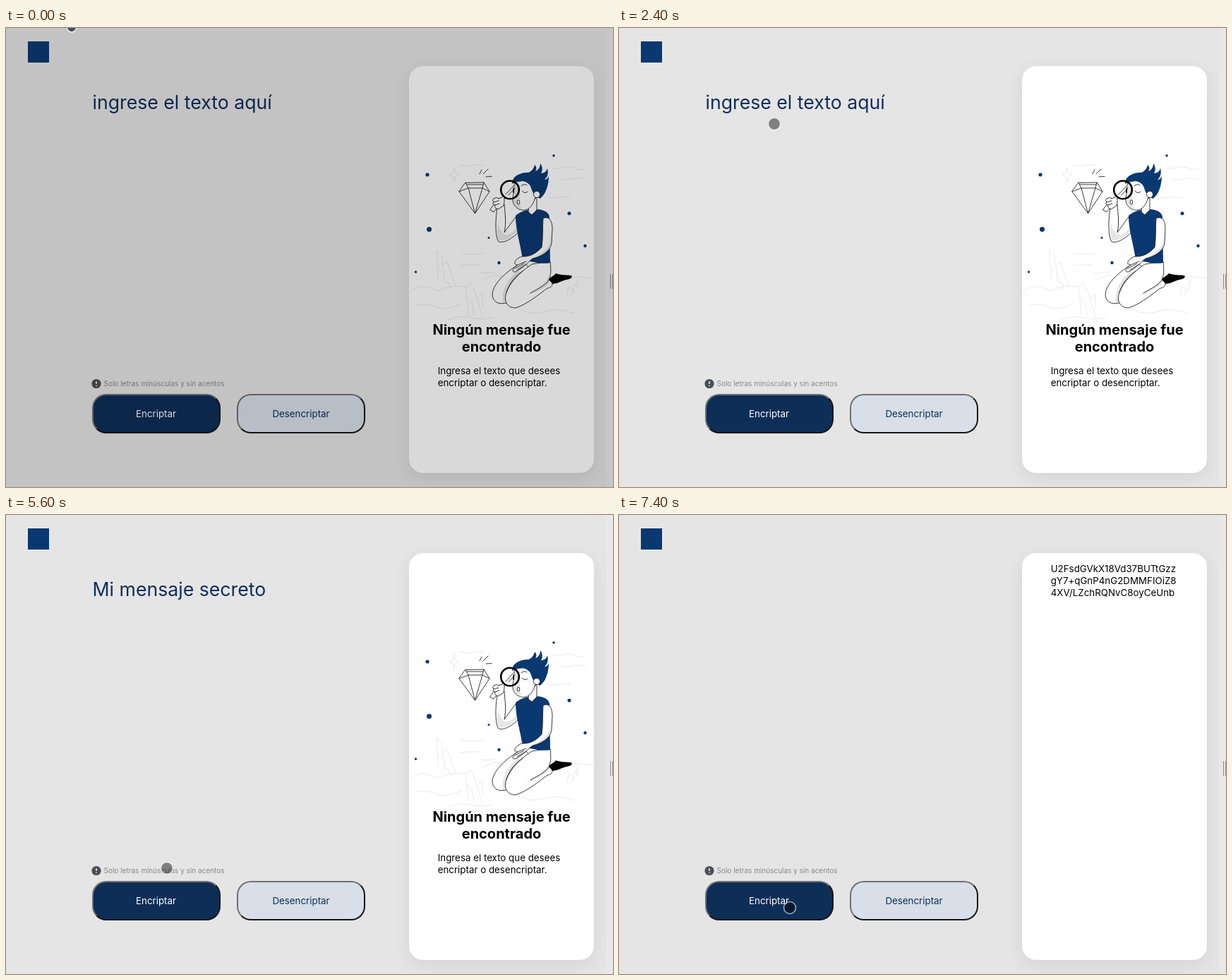
An HTML page for the animation above (8000 ms loop, 860 by 651 pixels).

```html
<!DOCTYPE html>
<html lang="es">
<head>
<meta charset="utf-8">
<style>
  html, body { margin: 0; width: 860px; height: 651px; overflow: hidden; background: #e5e5e5; }
  body { position: relative; font: 13.333px Inter, sans-serif; }
  div, svg { position: absolute; box-sizing: border-box; }
  svg { left: 0; top: 0; }
  .card { left: 571px; top: 54px; width: 262px; height: 577px; border-radius: 20px; background: #fff;
          box-shadow: 0 7px 26px rgba(0, 0, 0, .08); }
  .edge { left: 850px; top: 0; width: 10px; height: 651px; background: #e8e8e8; }
  .button { top: 519px; width: 182px; height: 56px; border: 2px solid; border-radius: 20px;
            border-color: #717171 #161616 #161616 #717171; text-align: center; line-height: 52px; }
  .button.pressed { border-color: #161616 #717171 #717171 #161616; }
  #encrypt { left: 121.5px; background: #0d2e57; color: #fff; }
  #decrypt { left: 327px; background: #d8dfe8; color: #0d2e57; }
  .ink { fill: none; stroke: #222; stroke-width: .9; stroke-linecap: round; stroke-linejoin: round; }
  .skin { fill: #fff; stroke: #222; stroke-width: .9; stroke-linejoin: round; }
  .navy { fill: #0a3871; }
  .faint { fill: none; stroke: #ebebeb; stroke-width: 1; }
  .shade { fill: #e6e6e6; }
</style>
</head>
<body>
<div class="card"></div>
<div class="edge"></div>
<div class="button" id="encrypt">Encriptar</div>
<div class="button" id="decrypt">Desencriptar</div>

<svg width="860" height="651" viewBox="0 0 860 651">
  <rect class="navy" x="31" y="19" width="30" height="30"/>
  <path d="M856.5 349V370M859.5 349V370" stroke="#8c8c8c"/>

  <text id="field" x="122.5" y="115" font-size="26.667" fill="#102e5c"></text>
  <rect id="caret" y="89" width="1" height="32" fill="#222"/>

  <circle cx="128" cy="504.5" r="6.6" fill="#495057"/>
  <path d="M128 501V505M128 506.7V508" stroke="#fff" stroke-width="1.4"/>
  <text x="138.5" y="508" font-size="10" fill="#888">Solo letras minúsculas y sin acentos</text>

  <g id="empty">
    <g class="faint">
      <path d="M635 198Q635 207 642 208Q636 209 635 218Q635 209 628 208Q634 207 635 198Z"/>
      <path d="M643 194q8 3 16 1t17 0M774 198q8 3 16 0t16 1 15 0M785 214q8 3 16 0t21 1M766 240q8 2 16 0t18 1"/>
      <path d="M645 320q16 2 32 0M643 337q14-2 27-1M672 347q12 2 22-1"/>
      <path d="M572 374Q585 365 594 367T612 373Q626 364 652 367M675 358L692 350L703 353M774 353Q805 351 833 355"/>
      <path d="M581 393Q598 390 610 396T645 391M626 414Q644 407 660 411T690 410M726 399Q745 408 764 402T806 405"/>
      <path d="M612 357L610 316L617 323L622 360M619 336L625 332L637 366M622 360L628 362L630 370M611 338L617 347"/>
      <path d="M655 406L651 367L658 362L665 375L675 411M668 383L674 377L676 396M652 381L660 390L664 408"/>
      <path d="M795 380L797 367L803 370L810 357L809 369L798 382M804 370L802 377"/>
    </g>
    <g class="ink">
      <path d="M651 219.5L677 219L685 232L664.5 263L642 232ZM642 232L655 227H675L685 232M651 219.5L655 227L664.5 263L675 227L677 219M653 222H676"/>
      <path d="M671 207L674 201M676 207L683 200M680 211L688 210.5"/>
    </g>
    <g class="navy">
      <circle cx="597" cy="208" r="2.6"/><circle cx="776" cy="181" r="1.8"/>
      <circle cx="599.5" cy="285.5" r="3.5"/><circle cx="798" cy="263" r="2.5"/>
      <circle cx="820.5" cy="309" r="2.2"/><circle cx="684" cy="297.5" r="1.5"/>
      <circle cx="698.5" cy="333" r="2.2"/><circle cx="580.5" cy="346" r="1.7"/>
    </g>

    <!-- legs and shoe -->
    <path d="M767 357C770 354 776 352 779 348C787 351 794 350 801 351C803 354 800 356 794 357C786 359 781 363 773 363Z"/>
    <path class="skin" d="M733 331C714 342 690 360 689 378C690 393 705 393 716 387L750 350Z"/>
    <path class="shade" d="M724 345C711 357 701 372 704 390L712 388L738 350Z"/>
    <path class="skin" d="M771 331C772 343 773 351 768 357C777 361 775 368 767 369C755 378 738 392 722 397C709 397 705 386 709 375C714 360 729 346 745 335Z"/>
    <path class="shade" d="M769 351C767 361 752 371 735 380C749 376 763 370 770 361Z"/>
    <path class="ink" d="M770 356C766 364 755 369 743 376M709 375C714 360 722 352 733 344"/>

    <!-- raised arm, torso and resting arm -->
    <path class="skin" d="M696 255C693 273 693 297 698 303C706 306 718 298 728 288L722 268L706 290C709 276 707 264 706 250Z"/>
    <path class="shade" d="M697 276C695 290 696 298 699 301C707 303 717 296 724 289L723 284C713 296 703 300 697 276Z"/>
    <path class="navy" d="M722 266C728 261 736 258 741 258L746 264L753 257C762 258 769 261 770 268L771 333C757 336 742 330 732 329C729 306 722 288 722 266Z"/>
    <path class="skin" d="M741 251L740 261L745 265L752 258V240Z"/>
    <path class="skin" d="M761 270C770 266 774 274 774 285L773 305C771 318 757 324 746 327C739 332 733 341 721 346C715 346 719 340 725 336C716 336 723 325 732 324C742 325 752 319 759 311C761 298 760 283 761 270Z"/>
    <path class="shade" d="M771 283L771 304C767 315 757 320 749 324C762 321 771 315 772 304Z"/>
    <path class="ink" d="M725 336L737 331M721 341L734 334M724 343L737 335"/>

    <!-- head -->
    <path class="skin" d="M720 219C721 230 717 241 718 245C719 255 730 261 739 257C746 253 750 243 751 234L744 214Z"/>
    <path class="shade" d="M728 223C729 236 726 250 731 258C724 255 720 252 719 244L721 221Z"/>
    <path class="navy" d="M717 221C717 211 727 205 740 205C745 203 748 199 749 194C752 197 752 200 750 203C755 201 757 197 757 192C761 197 760 203 758 206C763 206 766 203 767 199C769 206 767 212 763 215C766 215 768 213 769 210C769 223 764 238 756 242L748 235C744 232 745 223 739 220C732 215 723 217 717 221Z"/>
    <circle class="skin" cx="752" cy="236" r="4.6"/>
    <path class="ink" d="M730 224Q734 220 738 223M731 231Q735 236 739 232"/>
    <ellipse class="skin" cx="726" cy="247" rx="1.8" ry="3"/>

    <!-- magnifier and hand -->
    <path class="ink" d="M704 239L697 247M707 241L700 249M708 236L719 224M712 237L721 227"/>
    <path d="M719 227V234" stroke="#000" stroke-width="1.5"/>
    <circle cx="714" cy="229.5" r="12.8" fill="none" stroke="#000" stroke-width="2.6"/>
    <path class="skin" d="M698 241L703 245L691 261L685.5 258Z"/>
    <path class="skin" d="M691 242Q695 239 698 242L705 239Q707 243 705 252L697 257Q691 255 693 251Q688 250 691 247Q688 244 691 242Z"/>
    <path class="ink" d="M691 247L698 245M693 251L699 249"/>

    <g font-size="20" font-weight="700" text-anchor="middle">
      <text x="702" y="435">Ningún mensaje fue</text>
      <text x="702" y="459">encontrado</text>
    </g>
    <text x="611.7" y="491.3">Ingresa el texto que desees</text>
    <text x="611.7" y="508">encriptar o desencriptar.</text>
  </g>

  <g id="result">
    <text x="611.7" y="81.3">U2FsdGVkX18Vd37BUTtGzz</text>
    <text x="611.7" y="98">gY7+qGnP4nG2DMMFIOiZ8</text>
    <text x="611.7" y="114.7">4XV/LZchRQNvC8oyCeUnb</text>
  </g>

  <rect id="dim" width="860" height="651"/>
  <circle id="pointer" stroke-width="1.6"/>
</svg>

<script>
const LOOP = 8000;
const $ = id => document.getElementById(id);
const show = (id, on) => { $(id).style.display = on ? '' : 'none'; };
const set = (id, attrs) => { for (const k in attrs) $(id).setAttribute(k, attrs[k]); };
const clamp = p => Math.max(0, Math.min(1, p));
const mix = (a, b, p) => a + (b - a) * p;

const caretOn = [[2700, 3100], [3500, 4000], [4500, 5100], [5700, 6200], [6700, 7200]];

function pointerAt(t) {
  if (t < 5400) {
    const p = clamp((t - 400) / 600), s = p * p * (3 - 2 * p);
    return [mix(93, 220, s), mix(-1, 136, s)];
  }
  const p = clamp((t - 5300) / 500);
  return [mix(220, 242, p * p), mix(136, 557, 1 - (1 - p) ** 2.2)];
}

function draw(time) {
  const t = Math.floor(time % LOOP / 100) * 100;
  const done = t >= 7400, resting = t < 500;

  $('field').textContent = t < 2700 ? 'ingrese el texto aquí'
    : t >= 4700 && !done ? 'Mi mensaje secreto' : '';
  show('caret', caretOn.some(([from, to]) => t >= from && t < to));
  set('caret', { x: t < 4700 ? 123 : 368 });

  show('empty', !done);
  show('result', done);
  $('encrypt').classList.toggle('pressed', t === 7300);
  set('dim', { opacity: t < 2300 ? .15 : t < 2400 ? .11 : 0 });

  const [cx, cy] = pointerAt(t);
  set('pointer', {
    cx, cy, r: resting ? 6.7 : 8.5,
    fill: resting ? '#474b5e' : 'rgba(0,0,0,.44)',
    stroke: resting ? '#f0f0f0' : 'rgba(255,255,255,.6)'
  });
}

function frame() {
  draw(performance.now());
  requestAnimationFrame(frame);
}
frame();
</script>
</body>
</html>
```
